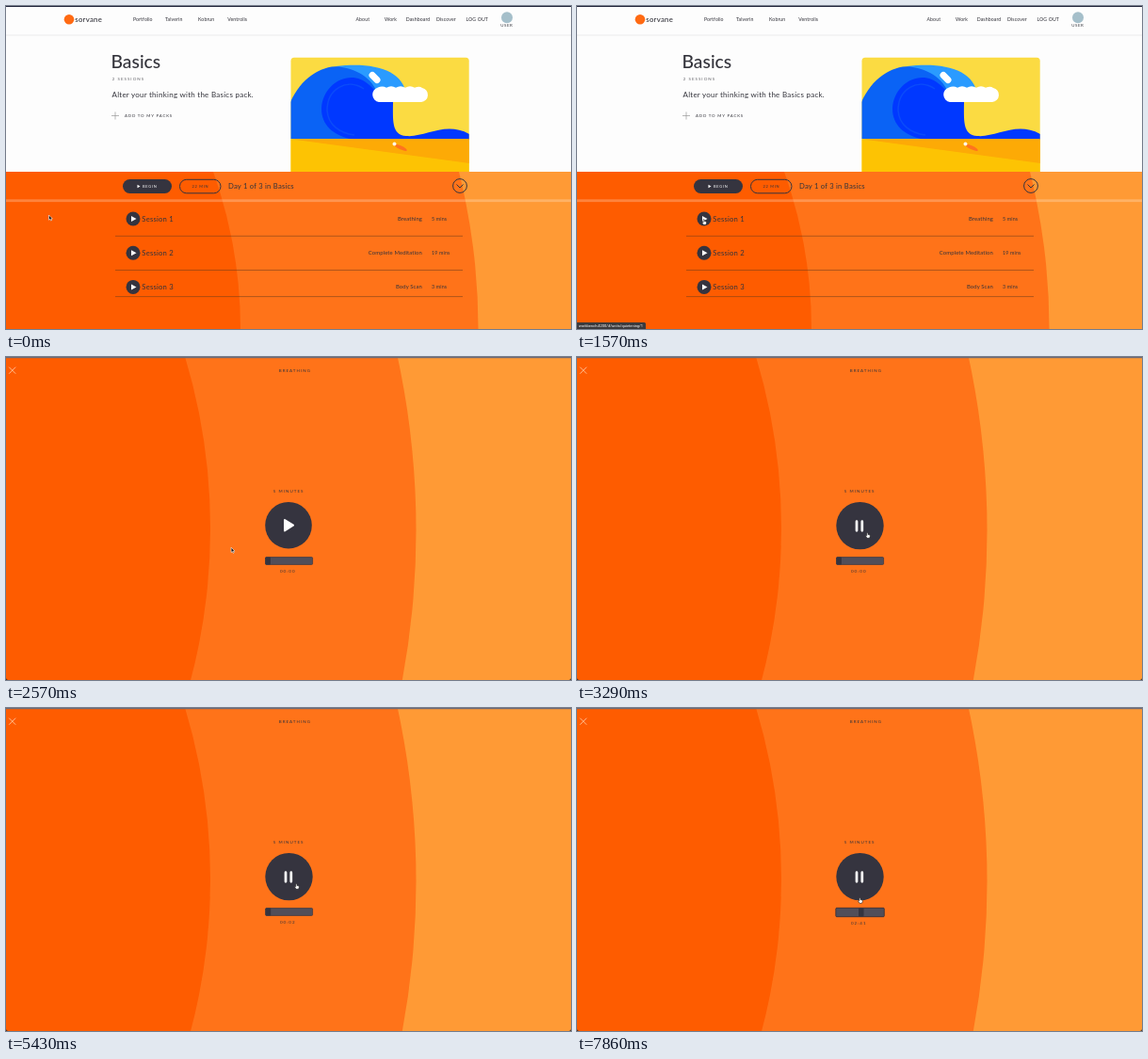
Recreate the animation shown at these times as an HTML page. Size 600x343 px, loop 8000 ms.

```html
<!DOCTYPE html>
<html lang="en">
<head>
<meta charset="utf-8">
<title>Meditation pack</title>
<style>
  html, body { margin: 0; width: 100%; height: 100%; overflow: hidden; background: #fdfdfd; }
  svg { display: block; width: 100%; height: 100%; }
  text { font-family: Lato, "Open Sans", sans-serif; fill: #33333b; white-space: pre; }
  .nav { font-size: 5.2px; letter-spacing: .1px; }
  .brand { font-size: 7.8px; letter-spacing: .25px; font-weight: 500; }
  .title { font-size: 19.3px; font-weight: 500; }
  .lead { font-size: 8px; letter-spacing: .25px; }
  .caps { font-size: 4.5px; letter-spacing: 1px; }
  .add { font-size: 4.4px; letter-spacing: .8px; }
  .pill { font-size: 4px; letter-spacing: .7px; }
  .row { font-size: 7.7px; letter-spacing: .2px; }
  .kind { font-size: 5.9px; letter-spacing: .12px; text-anchor: end; }
  .mins { font-size: 5.3px; letter-spacing: .15px; }
  .status { font: 4px Roboto, sans-serif; }
  .light { fill: #fff; }
  .line { fill: none; stroke: #35343f; }
  .dark { fill: #35343f; }
</style>
</head>
<body>
<svg viewBox="0 0 600 343" preserveAspectRatio="none">
  <defs>
    <clipPath id="card"><rect x="302.5" y="54.8" width="189.2" height="130" rx="3.5"/></clipPath>
    <clipPath id="lower"><rect y="176" width="600" height="167"/></clipPath>
  </defs>

  <g id="pack">
    <rect width="600" height="343" fill="#fdfdfd"/>
    <rect width="600" height="1" fill="#23263c"/>
    <path d="M0 31H600" stroke="#e6e6e8" stroke-width=".8"/>
    <circle cx="67" cy="14.2" r="5.3" fill="#ff6a13"/>
    <text class="brand" x="73.3" y="17">sorvane</text>
    <g id="nav"></g>
    <circle cx="532" cy="12.2" r="6" fill="#a5bfca"/>
    <text x="525.3" y="21.7" font-size="4.4" letter-spacing=".5">USER</text>

    <text class="title" x="111.5" y="66">Basics</text>
    <text class="caps" x="112.7" y="79.3" opacity=".75">2 SESSIONS</text>
    <text class="lead" x="112.5" y="96.6">Alter your thinking with the Basics pack.</text>
    <path d="M112 116.5h8M116 112.5v8" stroke="#999" stroke-width=".7"/>
    <text class="add" x="126" y="118.2">ADD TO MY PACKS</text>

    <g clip-path="url(#card)">
      <rect x="302" y="54" width="190" height="123" fill="#fbdb42"/>
      <path d="M302 102C314 76 334 63 356 64C379 65 393 81 397 100L410 141H302Z" fill="#0a63f5"/>
      <path d="M350 64C390 59 422 68 425 94H395C389 76 372 66 350 64Z" fill="#2a9bff"/>
      <path d="M335 109C336 82 366 65 386 84C393 91 399 98 411 100C411 121 409 137 425 138C445 140 466 122 492 136V142H370C347 138 335 126 335 109Z" fill="#0038ff"/>
      <path d="M341 111C341 88 362 76 380 88M341 111C342 126 354 135 370 137" fill="none" stroke="#0a4bfa" stroke-width="1.5"/>
      <path d="M396 102a8 8 0 0 1-1-15.600q5-2 9 .4q5-3 10 0q5-3 10 0q5-3 10 0q5-2 8 .2a7.600 7.600 0 0 1-1 15z" fill="#fff"/>
      <rect x="384.500" y="72.500" width="14" height="7" rx="3.500" fill="#fff" transform="rotate(45 391.500 76)"/>
      <rect x="302" y="141.300" width="190" height="36" fill="#fdc303"/>
      <path d="M302 141.300H492V167Z" fill="#fdaa06"/>
      <ellipse cx="419" cy="150.300" rx="7.500" ry="2" fill="#ff741d" transform="rotate(25 419 150.300)"/>
      <circle cx="412.500" cy="146.500" r="2" fill="#fff5e0"/>
    </g>

    <g clip-path="url(#lower)">
      <rect y="176" width="600" height="167" fill="#ff9a35"/>
      <circle cx="-188.500" cy="343" r="690" fill="#ff7319"/>
      <circle cx="-246" cy="343" r="495" fill="#fe5c00"/>
    </g>
    <rect y="205.300" width="600" height="2.800" fill="#fff" opacity=".24"/>
    <rect class="dark" x="124" y="184" width="52" height="15" rx="7.500"/>
    <path class="light" d="M139.500 189.700l3 1.800l-3 1.800z"/>
    <text class="pill light" x="145" y="193">BEGIN</text>
    <rect class="line" x="184.500" y="184.300" width="43.500" height="14.500" rx="7.250"/>
    <text class="pill" x="197.500" y="193">22 MIN</text>
    <text class="row" x="236" y="194.200">Day 1 of 3 in Basics</text>
    <circle class="line" cx="482" cy="191" r="7.400"/>
    <path class="line" d="M478.500 189.500l3.500 3.500l3.500-3.500"/>
    <g id="rows"></g>
  </g>

  <g id="player">
    <rect width="600" height="343" fill="#ff9a35"/>
    <circle cx="-434.500" cy="184" r="870" fill="#ff7319"/>
    <circle cx="-413" cy="182" r="630" fill="#fe5c00"/>
    <rect width="600" height="1.200" fill="#6f6a74"/>
    <path d="M0 340.500V343H2.500Q0 343 0 340.500M600 340.500V343H597.500Q600 343 600 340.500" fill="#222"/>
    <path d="M3.200 10.700l7 7m0-7l-7 7" stroke="#ffd3ae" stroke-width=".8"/>
    <text class="caps" x="289.800" y="16">BREATHING</text>
    <text class="caps" x="283.800" y="144.200">5 MINUTES</text>
    <circle class="dark" id="disc"/>
    <path class="light" id="play" d="M296 173l9 5.700l-9 5.700z" stroke="#fff" stroke-width="2" stroke-linejoin="round"/>
    <path id="pause" d="M297 174.700v9.600m5.800-9.600v9.600" stroke="#fff" stroke-width="2.700" stroke-linecap="round"/>
    <rect id="track" fill="#514e59" stroke="#3a3743" stroke-width=".7" rx="1"/>
    <rect id="thumb" class="dark" width="5.500" rx=".8"/>
    <text id="clock" class="caps" x="291" letter-spacing="1.400"></text>
  </g>

  <g id="status">
    <path d="M0 336H71.500Q73 336 73 337.500V343H0Z" fill="#3b3a3d"/>
    <text class="status light" x="1.800" y="341">workbench:4200/#/units/quietening/1</text>
  </g>
  <g id="cursor" stroke="#fff" stroke-width=".6" stroke-linejoin="round">
    <path id="arrow" d="M-1.500-3V2.200L-.300 1.200L.600 3L1.500 2.600L.700.900H2.300Z" fill="#111"/>
    <path id="hand" d="M-1.200-2.800Q-.500-3.300 0-2.600V-1L2.200-.500Q2.700 1.500 1.500 2.800H-1L-2.500.500Q-2-.300-1.200.300Z" fill="#fff" stroke="#222"/>
  </g>
</svg>
<script>
const $ = id => document.getElementById(id);
const show = (id, on) => $(id).setAttribute('display', on ? 'inline' : 'none');
const set = (id, attrs) => Object.entries(attrs).forEach(([k, v]) => $(id).setAttribute(k, v));
const clamp = x => Math.min(1, Math.max(0, x));

const links = [['Portfolio', 135], ['Talverin', 169], ['Kobrun', 204], ['Ventrolis', 235.3], ['About', 371.5],
  ['Work', 402], ['Dashboard', 424.7], ['Discover', 457], ['LOG OUT', 488.5]];
$('nav').innerHTML = links.map(([name, x]) => `<text class="nav" x="${x}" y="15.800">${name}</text>`).join('');

const sessions = [['Breathing', 5], ['Complete Meditation', 19], ['Body Scan', 3]];
$('rows').innerHTML = sessions.map(([kind, mins], i) => `
  <g transform="translate(0 ${226 + i * 36.2})">
    <circle class="dark" cx="135" r="7.500"/>
    <path class="light" d="M133-3l5.500 3l-5.500 3z"/>
    <text class="row" x="144.300" y="2.800">Session ${i + 1}</text>
    <text class="kind" x="442" y="2">${kind}</text>
    <text class="mins" x="452" y="2">${mins} mins</text>
    <path d="M116 ${i < 2 ? 18.3 : 10.2}H485" stroke="#6a3b1c" stroke-width=".7" opacity=".75"/>
  </g>`).join('');

// Cursor stops: time, x, y
const stops = [[430, 47, 225], [1570, 135.3, 229.5], [2000, 135.3, 229.5], [3000, 309, 189.5], [6140, 309, 189.5],
  [6570, 283, 214.5], [6710, 280, 216], [7140, 301, 216], [7430, 301, 204.5], [8000, 301, 204.5]];

function cursorAt(t) {
  const i = Math.max(1, stops.findIndex(s => s[0] >= t));
  const [a, b] = [stops[i - 1], stops[i]];
  const u = clamp((t - a[0]) / (b[0] - a[0]));
  const e = u * u * (3 - 2 * u);
  return [a[1] + (b[1] - a[1]) * e, a[2] + (b[2] - a[2]) * e];
}

function seconds(t) {
  if (t < 6710) return (t >= 4420) + (t >= 5420);
  return Math.round(2 + 158 * clamp((t - 6710) / 430)) + (t >= 7710);
}

function draw(t) {
  const onPlayer = t >= 1705;
  const playing = t >= 3135 && t < 6135 || t >= 7425;
  const active = t >= 6705;
  const hand = t >= 1425 && t < 2135 || t >= 2855 && t < 6280 || t >= 7280;
  const sec = seconds(t);
  const two = n => String(n).padStart(2, '0');

  show('pack', !onPlayer);
  show('player', onPlayer);
  show('status', t >= 1425 && t < 2135);
  show('play', !playing);
  show('pause', playing);
  show('arrow', !hand);
  show('hand', hand);
  set('disc', playing ? { cx: 300.5, cy: 179.1, r: 25.2 } : { cx: 300, cy: 178.7, r: 24.8 });
  set('track', active ? { x: 274.8, y: 212.3, width: 51.5, height: 9.4, stroke: '#2a2833' }
    : { x: 275.6, y: 212.6, width: 50, height: 7.8, stroke: '#3a3743' });
  set('thumb', { x: 275.4 + 44 * sec / 300, y: active ? 212.6 : 212.4, height: active ? 8.8 : 8.2 });
  set('clock', { y: active ? 230 : 228.6 });
  $('clock').textContent = two(Math.floor(sec / 60)) + ':' + two(sec % 60);
  set('cursor', { transform: `translate(${cursorAt(t)})` });
}

const step = 1000 / 7;
function frame() {
  const t = performance.now() % 8000;
  draw(Math.floor((t + 5) / step) * step % 8000);
  requestAnimationFrame(frame);
}
frame();
</script>
</body>
</html>
```
